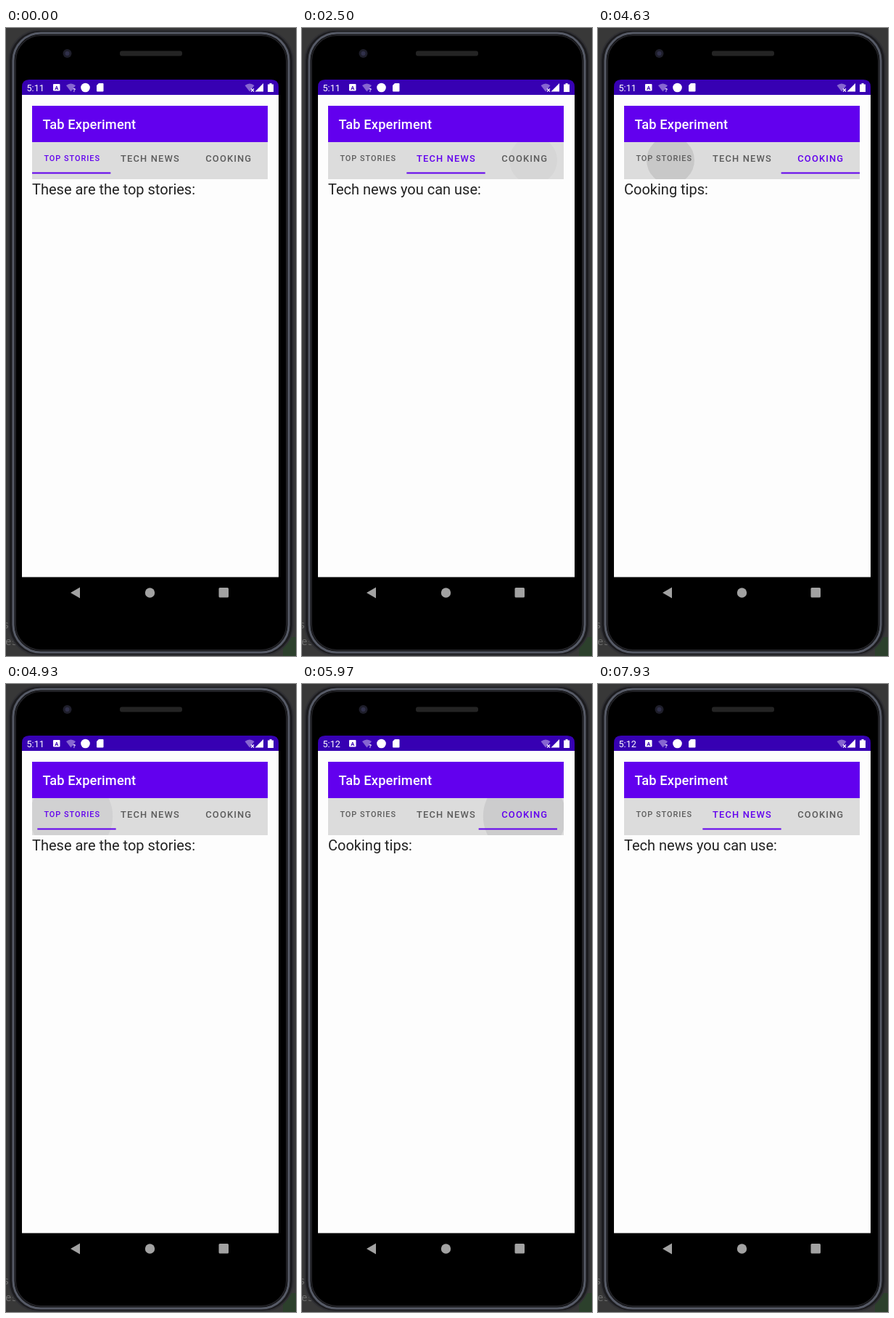
An HTML page for the animation above (8 s loop, 400 by 864 pixels).

```html
<!DOCTYPE html>
<html lang="en">
<head>
<meta charset="utf-8">
<title>Tab Experiment</title>
<style>
html, body { margin: 0; height: 100%; overflow: hidden; background: #000; }
svg { display: block; width: 100vw; height: 100vh; }
text { font-family: Roboto, sans-serif; white-space: pre; }
#desk text { font: 14px 'DejaVu Sans Mono', monospace; }
#tabs text { font-size: 12.9px; font-weight: 500; letter-spacing: .0893em; }
#tabs text:first-child { font-size: 10.9px; }
#pages text { font-size: 20px; fill: #222; }
</style>
</head>
<body>
<svg viewBox="0 0 400 864">
  <defs>
    <clipPath id="bar"><rect x="36" y="157" width="325" height="51"/></clipPath>
    <clipPath id="pager"><rect x="36" y="208" width="325" height="547"/></clipPath>
  </defs>

  <!-- desktop behind the phone -->
  <g id="desk" fill="#6c6c6c">
    <rect width="400" height="864" fill="#383838"/>
    <rect x="382" y="838" width="18" height="26" fill="#2c402c"/>
    <text x="-4" y="826">s</text>
    <text x="-1" y="849">es</text>
  </g>

  <!-- phone body -->
  <rect x="4" y="3" width="392" height="860" rx="42" fill="#1c1c1f" stroke="#303034" stroke-width="2"/>
  <rect x="10" y="7" width="380" height="852" rx="38" fill="#000" stroke="#565a66" stroke-width="3"/>
  <rect x="13" y="10" width="374" height="846" rx="35" fill="#000" stroke="#202024" stroke-width="2"/>
  <circle cx="84.500" cy="35" r="6" fill="#1e1e2a"/>
  <circle cx="84.500" cy="35" r="3" fill="#30304a"/>
  <rect x="157" y="31.500" width="86" height="7" rx="3" fill="#242424"/>

  <!-- screen -->
  <rect x="22" y="92" width="354" height="663" fill="#fdfdfd"/>
  <path d="M22 92V81q0-10 10-10H366q10 0 10 10V92Z" fill="#3700b3"/>
  <path d="M22 755.500H376" stroke="#777"/>

  <g fill="#fff">
    <text id="clock" x="28.500" y="86.500" font-size="12.6"></text>
    <rect x="65" y="77" width="9.500" height="9.500" rx="1"/>
    <text x="69.750" y="84.600" font-size="7.500" font-weight="700" text-anchor="middle" fill="#3700b3">A</text>
    <circle cx="109.500" cy="82" r="6.300"/>
    <path d="M128 76h5.500q1 0 1 1v9.500q0 1-1 1h-7.500q-1 0-1-1V79Z"/>
    <path d="M355 76V87.500H343.500Z"/>
    <path d="M363.500 77.500v-1.500h3v1.500h2.500V88h-8V77.500Z"/>
    <g fill-opacity=".4">
      <path d="M83 79q6.500-5 13 0L89.500 87.500Z"/>
      <path d="M329.500 79q6.500-5 13 0L336 87.500Z"/>
    </g>
    <text x="92" y="88" font-size="8" font-weight="700">?</text>
    <path d="M338 83.500l4 4m0-4l-4 4" stroke="#fff" stroke-width="1.200"/>
  </g>

  <rect x="36" y="107" width="325" height="50" fill="#6200ee"/>
  <text x="50.500" y="139" font-size="18.250" font-weight="500" letter-spacing=".14" fill="#fff">Tab Experiment</text>
  <rect x="36" y="157" width="325" height="51" fill="#dcdcdc"/>
  <g id="ripples" clip-path="url(#bar)"></g>
  <g id="tabs"></g>
  <rect id="mark" y="198.500" width="108.330" height="2" fill="#6200ee"/>
  <g id="pages" clip-path="url(#pager)"></g>

  <!-- navigation buttons -->
  <g fill="#a2a2a2">
    <path d="M89 777L102 769.500V784.500Z"/>
    <circle cx="198.500" cy="777" r="6.700"/>
    <rect x="293.500" y="770" width="13.500" height="13.500" rx="1.500"/>
  </g>
</svg>

<script>
const LOOP = 8000, LEFT = 36, WIDTH = 325, TAB = WIDTH / 3;
const $ = id => document.getElementById(id);

// age: how long the ripple has been fading in when it appears
const taps = [
  { press: 1500, go: 1680, to: 1, x: 198, age: 20 },
  { press: 2500, go: 2580, to: 2, x: 319, age: 20 },
  { press: 4630, go: 4700, to: 0, x: 100, age: 70 },
  { press: 5060, go: 5310, to: 1, x: 200, age: 20 },
  { press: 5640, go: 5773, to: 2, x: 308, age: 20 },
  { press: 6330, go: 6390, to: 0, x: 95, age: 20 }
];
const swipe = { start: 7230, end: 7920 };

function add(parent, tag, attrs, label = '') {
  const el = document.createElementNS('http://www.w3.org/2000/svg', tag);
  for (const k in attrs) el.setAttribute(k, attrs[k]);
  el.textContent = label;
  return $(parent).appendChild(el);
}

const tabs = [['TOP STORIES', 52.4, 183.4], ['TECH NEWS', 158, 184], ['COOKING', 275.3, 184]]
  .map(([label, x, y]) => add('tabs', 'text', { x, y }, label));
const pages = ['These are the top stories:', 'Tech news you can use:', 'Cooking tips:']
  .map(label => add('pages', 'text', { y: 229 }, label));
const ripples = taps.map(() => add('ripples', 'circle', { cy: 182 }));

const clamp = v => Math.max(0, Math.min(1, v));
const mix = (a, b, p) => a + (b - a) * p;
const quint = u => 1 - (1 - u) ** 5;
const smooth = u => u * u * (3 - 2 * u);

// cubic-bezier(.4, 0, .2, 1)
function standard(u) {
  let lo = 0, hi = 1, s;
  for (let i = 0; i < 24; i++) {
    s = (lo + hi) / 2;
    const r = 1 - s;
    if (1.2 * r * r * s + .6 * r * s * s + s ** 3 < u) lo = s; else hi = s;
  }
  return smooth(s);
}

function drawRipple(el, tap, t) {
  const held = t - tap.press, since = t - tap.go;
  const grow = smooth(clamp(held / 225));
  const alpha = held < 0 ? 0 : clamp((held + tap.age) / 70) * (1 - clamp((since - 80) / 220));
  el.setAttribute('cx', mix(tap.x, LEFT + TAB * (tap.to + .5), grow));
  el.setAttribute('r', mix(33, 57, grow));
  el.setAttribute('fill', since < 0 ? '#000' : '#484858');
  el.setAttribute('fill-opacity', alpha * (since < 0 ? .09 : .24));
}

function draw(t) {
  let mark = 0, page = 0, chosen = 0;
  taps.forEach((tap, i) => {
    drawRipple(ripples[i], tap, t);
    if (t < tap.go) return;
    mark = mix(mark, tap.to, standard(clamp((t - tap.go) / 300)));
    page = mix(page, tap.to, quint(clamp((t - tap.go) / 190)));
    chosen = tap.to;
  });
  if (t >= swipe.start) {
    const u = clamp((t - swipe.start) / (swipe.end - swipe.start));
    mark = page = smooth(u) ** .65;
    chosen = Math.round(page);
  }
  $('mark').setAttribute('x', LEFT + TAB * mark);
  pages.forEach((el, i) => el.setAttribute('x', LEFT + WIDTH * (i - page)));
  tabs.forEach((el, i) => el.setAttribute('fill', i === chosen ? '#6200ee' : '#5c5c5c'));
  $('clock').textContent = t < 5050 ? '5:11' : '5:12';
}

function tick() {
  draw(performance.now() % LOOP);
  requestAnimationFrame(tick);
}
tick();
</script>
</body>
</html>
```
